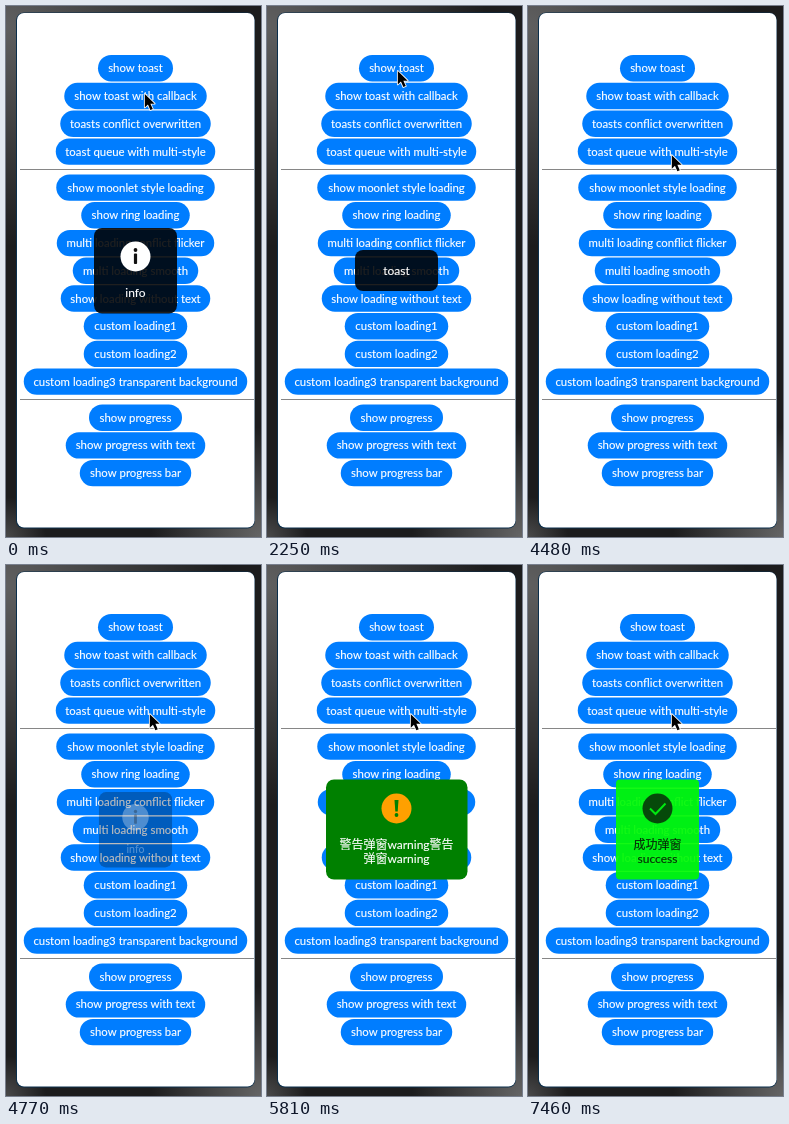
Animation, 255 px wide and 531 px high, one loop 8 s. Source, as an HTML page with a canvas:

```html
<!DOCTYPE html>
<html lang="en">
<head>
<meta charset="utf-8">
<title>Toast demo</title>
<style>
  html, body { margin: 0; width: 100%; height: 100%; overflow: hidden; background: #1b1b1d; }
  canvas { display: block; width: 255px; height: 531px; }
</style>
</head>
<body>
<canvas id="stage" width="255" height="531"></canvas>
<script>
const ctx = document.getElementById('stage').getContext('2d');
const LOOP = 8000;
const STEP = 149.2; // the picture advances in discrete steps
const MID = 129.5;
const BLUE = '#007dff';
const FONT = 'Lato, "Noto Sans CJK SC", "Noto Sans CJK", sans-serif';

// Label, centre y, width
const buttons = [
  ['show toast', 62.2, 75],
  ['show toast with callback', 90, 142.5],
  ['toasts conflict overwritten', 117.8, 150.5],
  ['toast queue with multi-style', 145.6, 159.5],
  ['show moonlet style loading', 181.6, 158.5],
  ['show ring loading', 209.3, 108.5],
  ['multi loading conflict flicker', 237.1, 157.5],
  ['multi loading smooth', 264.8, 125.5],
  ['show loading without text', 292.5, 149.5],
  ['custom loading1', 320.2, 103.5],
  ['custom loading2', 347.9, 103.5],
  ['custom loading3 transparent background', 375.6, 223.5],
  ['show progress', 411.7, 93],
  ['show progress with text', 439.4, 139.5],
  ['show progress bar', 467.1, 111.5]
];

function box(x, y, w, h, r, fill) {
  ctx.beginPath();
  ctx.roundRect(x, y, w, h, r);
  ctx.fillStyle = fill;
  ctx.fill();
}

function disc(x, y, r, fill) {
  ctx.beginPath();
  ctx.arc(x, y, r, 0, Math.PI * 2);
  ctx.fillStyle = fill;
  ctx.fill();
}

function label(text, y, size, color) {
  ctx.font = `400 ${size}px ${FONT}`;
  ctx.textAlign = 'center';
  ctx.fillStyle = ctx.strokeStyle = color;
  ctx.lineWidth = 0.15;
  ctx.fillText(text, MID, y);
  ctx.strokeText(text, MID, y);
}

// A soft grey reflection on the bezel
function shine(x, y, r, alpha) {
  const g = ctx.createRadialGradient(x, y, 0, x, y, r);
  g.addColorStop(0, `rgba(140,140,140,${alpha})`);
  g.addColorStop(1, 'rgba(140,140,140,0)');
  ctx.fillStyle = g;
  ctx.fillRect(0, 0, 255, 531);
}

function drawPhone() {
  ctx.fillStyle = '#1c1c1d';
  ctx.fillRect(0, 0, 255, 531);
  shine(0, 20, 220, 0.6);
  shine(255, 531, 110, 0.65);
  shine(0, 531, 40, 0.4);

  box(10, 6.5, 239, 516, 8, '#0b2f4c');
  box(11, 7, 237.5, 514.5, 7, '#fff');
  ctx.fillStyle = '#868686';
  ctx.fillRect(14, 163, 234, 1);
  ctx.fillRect(14, 393, 234, 1);
  for (const [text, y, w] of buttons) {
    box(MID - w / 2, y - 13.2, w, 26.4, 13.2, BLUE);
    label(text, y + 4, 11.4, '#fff');
  }
}

const popups = {
  info() {
    box(88, 222, 83, 85.5, 8, 'rgba(0,0,0,.88)');
    disc(MID, 250.5, 15, '#fff');
    disc(MID, 244, 1.9, '#111');
    box(MID - 1.6, 247.5, 3.2, 10.5, 1, '#111');
    label('info', 291, 12, '#fff');
  },
  toast() {
    box(88, 244, 83, 41, 8, 'rgba(0,0,0,.88)');
    label('toast', 269, 12, '#fff');
  },
  warning() {
    box(59, 214.5, 141.5, 100, 8, '#008000');
    disc(MID, 243.5, 15, '#ffa000');
    ctx.beginPath();
    ctx.moveTo(MID - 2, 235);
    ctx.lineTo(MID + 2, 235);
    ctx.lineTo(MID + 1.2, 246.5);
    ctx.lineTo(MID - 1.2, 246.5);
    ctx.fillStyle = '#008000';
    ctx.fill();
    disc(MID, 250, 1.9, '#008000');
    label('警告弹窗warning警告', 283.7, 12, '#fff');
    label('弹窗warning', 298, 12, '#fff');
  },
  success() {
    box(88, 214.5, 83, 100, 4, 'rgba(0,250,0,.92)');
    disc(MID, 243.5, 15, '#064a0a');
    ctx.beginPath();
    ctx.moveTo(122, 243.5);
    ctx.lineTo(127.5, 249);
    ctx.lineTo(137.5, 238.5);
    ctx.strokeStyle = '#00e810';
    ctx.lineWidth = 2;
    ctx.stroke();
    label('成功弹窗', 283.7, 12, '#062c08');
    label('success', 298, 12, '#062c08');
  }
};

// Popup, then [step, opacity] points
const shows = [
  ['info', [[0, 1], [5, 1], [6, 0.25], [7, 0]]],
  ['toast', [[13, 0], [14, 0.4], [15, 1], [19, 1], [20, 0.25], [21, 0]]],
  ['info', [[31, 0], [32, 0.3], [33, 1], [34, 0.25], [35, 0]]],
  ['warning', [[37, 0], [38, 0.5], [39, 1], [47, 1], [48, 0.25], [49, 0]]],
  ['success', [[48, 0], [49, 0.4], [50, 1]]]
];

const pointerX = [[6, 138.8], [12, 130.8], [22, 130.8], [30, 143.8]];
const pointerY = [[6, 88], [12, 65], [22, 65], [30, 149.2]];

function at(points, k) {
  if (k <= points[0][0]) return points[0][1];
  for (let i = 1; i < points.length; i++) {
    const [k0, v0] = points[i - 1], [k1, v1] = points[i];
    if (k <= k1) return v0 + (v1 - v0) * (k - k0) / (k1 - k0);
  }
  return points[points.length - 1][1];
}

function drawPopup(name, opacity) {
  if (opacity <= 0) return;
  const scale = 0.83 + 0.17 * opacity;
  ctx.save();
  ctx.globalAlpha = opacity;
  ctx.translate(MID, 264.7);
  ctx.scale(scale, scale);
  ctx.translate(-MID, -264.7);
  popups[name]();
  ctx.restore();
}

function drawPointer(x, y) {
  ctx.save();
  ctx.translate(x, y);
  ctx.scale(0.93, 0.93);
  const p = new Path2D('M0 0V14.5L3.4 11.4L6 17.3L8.6 16.1L6 10.4H10.6Z');
  ctx.lineJoin = 'round';
  ctx.lineWidth = 1.8;
  ctx.strokeStyle = '#fff';
  ctx.stroke(p);
  ctx.fillStyle = '#000';
  ctx.fill(p);
  ctx.restore();
}

function render(now) {
  const k = Math.floor((now % LOOP + 10) / STEP);
  drawPhone();
  for (const [name, points] of shows) drawPopup(name, at(points, k));
  drawPointer(at(pointerX, k), at(pointerY, k));
}

let start;
function tick(now) {
  start ??= now;
  render(now - start);
  requestAnimationFrame(tick);
}
render(0);
requestAnimationFrame(tick);
</script>
</body>
</html>
```
